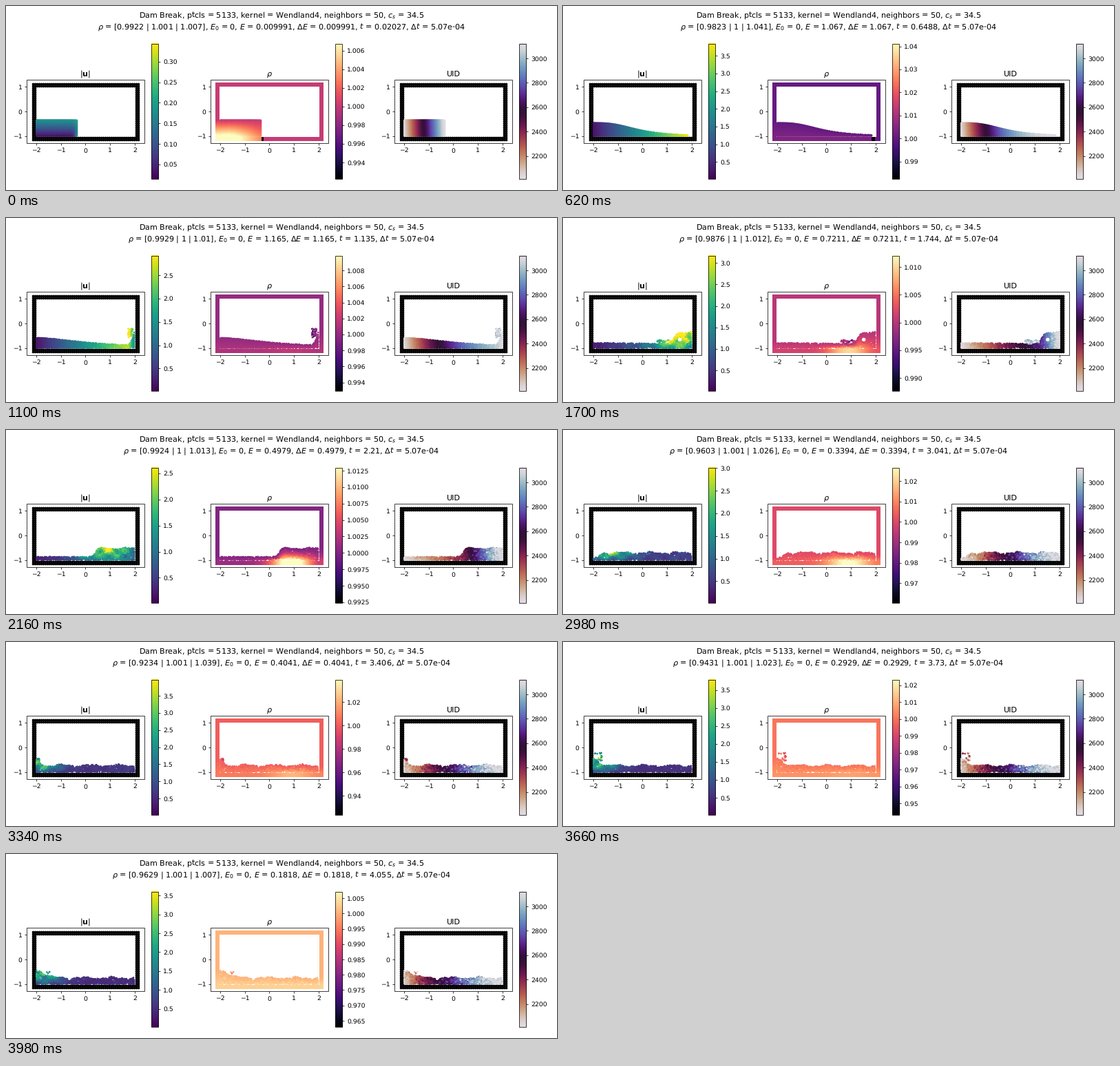
A matplotlib script for the animation above (4 s loop, 800 px wide and 267 px high).

```python
import numpy as np
import matplotlib as mpl
import matplotlib.pyplot as plt
from matplotlib.animation import FuncAnimation
from matplotlib.patches import Rectangle
from matplotlib.ticker import MaxNLocator

W, H, FRAMES = 800, 267, 200
PX = 0.72                        # points per pixel at 100 dpi
DT = 0.020274                    # simulated seconds per frame
UNIT, MID_Y = 35.8, 153.2        # pixels per data unit, panel centre line
CENTRES = (115.3, 382.3, 649.3)
HALF_W, HALF_H = 85.3, 45.9
BAR_TOP, BAR_BOTTOM, BAR_W = 55.2, 251.3, 10.2
COLS, ROWS = 53, 21
VOLUME = 1.112
UID_RANGE = (2009, 3118)

# Readouts at a few moments: rho min, mean, max, energy, top speed
READOUTS = {
    0: (.9922, 1.001, 1.0067, .009991, .343),
    31: (.9823, 1, 1.041, 1.067, 3.83),
    55: (.9929, 1, 1.0098, 1.165, 2.91),
    85: (.9876, 1, 1.012, .7211, 3.16),
    131: (.9971, 1.001, 1.0138, .2747, 2.04),
    167: (.9234, 1.001, 1.039, .4041, 3.96),
    199: (.9629, 1.001, 1.007, .1818, 3.59),
}

mpl.rcParams["text.hinting"] = "no_hinting"


def readouts(n):
    return [np.interp(n, list(READOUTS), c) for c in zip(*READOUTS.values())]


def ramp(t, a, b):
    u = np.clip((t - a) / (b - a), 0, 1)
    return u * u * (3 - 2 * u)


def sigmoid(u):
    return 1 / (1 + np.exp(-np.clip(u, -50, 50)))


def bell(u):
    return np.exp(-u * u)


def reflect(v):
    return np.clip(1 - np.abs(1 - np.abs(v)), 0, 1)


def front(t):
    """Leading edge of the collapsing column."""
    return min(2, -0.33 + 2.18 * (t / 0.649) ** 1.4 - 0.017 * (t < 0.03))


def bore(t):
    """Edge of the wave thrown back by the right wall."""
    return max(-2.4, 1.95 - 1.227 * max(0, t - 1.05) ** 1.6)


def mixing(t):
    return float(np.clip((t - 1) / 1.6, 0, 1))


def surface(t):
    """Height of the water above the floor; its volume is constant."""
    x = np.linspace(-2, front(t), 400)
    s = (x + 2) / (x[-1] + 2)
    bend = 0.46 + 1.2 * np.exp(-t / 0.15) + 1.2 * max(0, t - 0.65) ** 3
    power = 1.4 + 10 * np.exp(-t / 0.35)
    base = 1 / (1 + (s / bend) ** power)
    back = 0.7 * np.exp(-(t - 1.1) / 1.6) * ramp(t, 0.72, 1.0)
    bump = back * sigmoid((x - bore(t)) / 0.06)
    late = max(0, t - 3.15)
    bump += (0.32 * (1 - np.exp(-late / 0.25))
             * bell((x + 2) / (0.1 + 0.4 * late)))
    bump += (0.035 * mixing(t) * sigmoid((x - bore(t)) / 0.1)
             * (np.sin(5.5 * x + 2 * t) + 0.5 * np.sin(13 * x - 3 * t)))
    return x, base * (VOLUME / (x[-1] + 2) - bump.mean()) / base.mean() + bump


rng = np.random.default_rng(4)
col, row = [g.ravel() for g in
            np.meshgrid(np.arange(COLS), np.arange(ROWS), indexing="ij")]
COUNT = col.size
along0, up0 = (col + 0.5) / COLS, (row + 0.5) / ROWS
stagger = ((row * 8 % ROWS + 0.5) / ROWS - 0.5) / COLS
drift = rng.normal(size=COUNT) * (0.02 + 0.07 * along0)
lift = rng.normal(size=COUNT) * 0.15
phase = rng.uniform(0, 2 * np.pi, COUNT)
grain = rng.normal(size=COUNT)
thin = rng.random(COUNT) ** 5


def make_spray(count, pool, start, origin, vx, vy):
    idx = rng.choice(np.flatnonzero(pool), count, replace=False)
    return idx, start, origin, rng.uniform(*vx, count), rng.uniform(*vy, count)


SPRAYS = [
    make_spray(40, along0 > 0.8, 0.77, (1.95, -.7), (-.6, -.1), (1.3, 2.3)),
    make_spray(35, along0 > 0.75, 1.34, (1.5, -.45), (-2.3, -.8), (.1, .5)),
    make_spray(26, along0 < 0.4, 3.3, (-1.95, -.65), (.05, .75), (1.1, 2.1)),
]


def fluid(t, grid, top):
    """Positions, relative place and spray mask of all particles."""
    mix = mixing(t)
    q = reflect(along0 + stagger * min(1, t / 0.25) + mix * drift)
    up = reflect(up0 + mix * lift)
    cdf = np.cumsum(top)
    x = np.interp(q, np.r_[0, cdf / cdf[-1]], np.r_[-2, grid])
    y = -1 + up * np.interp(x, grid, top)
    x += mix * 0.015 * np.sin(7.4 * t + phase)
    y += mix * 0.012 * np.cos(6.4 * t + phase)

    # Air pocket under the breaking wave
    r = 0.13 * max(0, 1 - abs(t - 1.72) / 0.4)
    dx, dy = x - 1.52, y + 0.65
    dist = np.hypot(dx, dy) + 1e-6
    push = np.where(dist < r, r / dist, 1)
    x, y = 1.52 + dx * push, -0.65 + dy * push

    flying = np.zeros(COUNT, bool)
    for idx, start, (x0, y0), vx, vy in SPRAYS:
        s = t - start
        if s <= 0:
            continue
        px, py = x0 + vx * s, y0 + vy * s - 2.5 * s * s
        free = py > -1 + np.interp(px, grid, top)
        hit = idx[free]
        x[hit], y[hit], flying[hit] = px[free], py[free], True
    return np.clip(x, -1.98, 1.98), np.maximum(y, -0.985), q, up, flying


def speed(t, x, y, q, up, flying):
    """Speed relative to the fastest particle."""
    s = (x + 2) / (front(t) + 2)
    run = (0.04 + 0.95 * s) * np.exp(-max(0, t - 1.1) / 0.9)
    run *= 1 - 0.45 * ramp(t, 0.7, 0.9) * sigmoid((x - 1.85) / 0.04)
    crash = 0.4 * bell(x - bore(t) - 0.4) * ramp(t, 1.1, 1.7)
    swirl = np.sin(9 * x + 4 * t) * np.sin(14 * y - 2.5 * t)
    flow = run + crash * (0.4 + 1.2 * up)
    flow = flow * (1 + mixing(t) * (0.4 * swirl + 0.12 * grain))
    flow += 0.1 * mixing(t) + 0.15 * flying
    sink = 0.03 + 0.48 * up + 0.6 * np.exp(-25 * (1 - q) - 2 * up)
    start = np.exp(-(t - DT) / 0.16)
    return np.clip(start * sink + (1 - start) * flow, 0, 1)


def excess(t, x, depth):
    """Density added by the water above and by the plunging wave."""
    still = 0.47 * np.exp(-(t - DT) / 0.15) * bell((x + 1.7) / 1.3)
    blow = 0.75 * bell((t - 2.4) / 0.75) * bell((x - 0.9) / 0.85)
    return depth * (still + 0.06) + depth ** 1.7 * blow


fig = plt.figure(figsize=(8, 2.67), dpi=100, facecolor="white")
ax = fig.add_axes([0, 0, 1, 1])
ax.axis("off")

TICK = dict(ls="none", color="k", ms=3.24 * PX, mew=0.74 * PX)
SMALL, LARGE = 9.26 * PX, 11.11 * PX
CMAPS = ("viridis", "magma", "twilight_r")


def frame_box(x, y, w, h):
    ax.add_patch(Rectangle((x, y), w, h, fc="none", ec="k",
                           lw=0.74 * PX, zorder=5))


def minus(v):
    return str(v).replace("-", "\u2212")


def draw_panel(cx, title):
    left, bottom = cx - HALF_W, MID_Y + HALF_H
    frame_box(left, MID_Y - HALF_H, 2 * HALF_W, 2 * HALF_H)
    ax.text(cx, MID_Y - HALF_H - 5.4, title, ha="center", fontsize=LARGE)
    xt, yt = np.arange(-2, 3), np.arange(-1, 2)
    ax.plot(cx + xt * UNIT, np.full(5, bottom), marker=3, **TICK)
    ax.plot(np.full(3, left), MID_Y - yt * UNIT, marker=0, **TICK)
    for v in xt:
        ax.text(cx + v * UNIT, bottom + 6.5, minus(v), ha="center", va="top",
                fontsize=SMALL)
    for v in yt:
        ax.text(left - 6.5, MID_Y - v * UNIT, minus(v), ha="right",
                va="center_baseline", fontsize=SMALL)


class Bar:
    """Colour bar whose ticks follow a changing range."""
    locator = MaxNLocator(nbins=9, steps=[1, 2, 2.5, 5, 10])

    def __init__(self, cx, cmap):
        x = cx + 95.9
        self.right = x + BAR_W
        ax.imshow(np.linspace(1, 0, 256)[:, None], cmap=cmap, aspect="auto",
                  interpolation="nearest",
                  extent=(x, self.right, BAR_BOTTOM, BAR_TOP))
        frame_box(x, BAR_TOP, BAR_W, BAR_BOTTOM - BAR_TOP)
        self.ticks, = ax.plot([], [], marker=1, **TICK)
        self.labels = [ax.text(0, 0, "", va="center_baseline", fontsize=SMALL)
                       for _ in range(11)]

    def set_range(self, lo, hi):
        values = self.locator.tick_values(lo, hi)
        step = values[1] - values[0]
        digits = next((d for d in range(5) if
                       abs(step * 10**d - round(step * 10**d)) < 1e-5), 5)
        values = [v for v in values if lo <= v <= hi][:len(self.labels)]
        ys = [BAR_BOTTOM - (v - lo) / (hi - lo) * (BAR_BOTTOM - BAR_TOP)
              for v in values]
        self.ticks.set_data([self.right] * len(ys), ys)
        for label in self.labels:
            label.set_text("")
        for label, v, y in zip(self.labels, values, ys):
            label.set_text(f"{v:.{digits}f}")
            label.set_position((self.right + 6.5, y))


for cx, title in zip(CENTRES, (r"$|\mathbf{u}|$", r"$\rho$", "UID")):
    draw_panel(cx, title)
bars = [Bar(cx, cmap) for cx, cmap in zip(CENTRES, CMAPS)]
bars[2].set_range(*UID_RANGE)

# Dotted black walls
gx, gy = np.meshgrid(np.arange(-76.5, 77, 3), np.arange(-40.5, 41, 3))
edge = (np.abs(gx) > 72) | (np.abs(gy) > 36)
for cx in (CENTRES[0], CENTRES[2]):
    ax.plot(cx + gx[edge], MID_Y + gy[edge], "o", color="k",
            ms=3.7 * PX, mew=0, zorder=2)

# Wall carrying the density of the fluid beside it
wx, wy = np.meshgrid(np.arange(-78, 78.5), np.arange(42, -42.5, -1))
wall = (np.abs(wx) > 72) | (np.abs(wy) > 36)
wall_x = np.clip(wx[wall] / UNIT, -2, 2)
wall_y = np.clip(wy[wall] / UNIT, -1, 1)
wall_img = ax.imshow(np.full(wx.shape, np.nan), cmap=CMAPS[1], vmin=0, vmax=1,
                     aspect="auto", interpolation="nearest", zorder=2,
                     extent=(CENTRES[1] - 78.5, CENTRES[1] + 78.5,
                             MID_Y + 42.5, MID_Y - 42.5))

dots = [ax.scatter(np.zeros(COUNT), np.zeros(COUNT), s=(2.8 * PX) ** 2,
                   c=np.linspace(0, 1, COUNT), cmap=cmap, vmin=0, vmax=1,
                   linewidths=0, zorder=3) for cmap in CMAPS]

HEAD = ("Dam Break, ptcls = 5133, kernel = Wendland4, "
        "neighbors = 50, $c_s$ = 34.5\n")
head = ax.text(400, 6.2, HEAD, ha="center", va="top", fontsize=LARGE)
ax.set_xlim(0, W)
ax.set_ylim(H, 0)


def wall_density(t, rest, grid, top):
    height = np.interp(wall_x, grid, top, right=0)
    depth = np.clip(1 - (wall_y + 1) / np.maximum(height, 1e-3), 0, 1)
    rho = rest + excess(t, wall_x, depth * (height > 0))
    if grid[-1] < 2:                            # thin spot at the front
        gap = np.abs(wall_x - grid[-1] - 0.05) < 0.03 + 0.05 * t
        rho[gap & (wall_y < -0.99)] = 0
    return np.clip(rho, 0, 1)


def update(n):
    t = DT * (n + 1)
    grid, top = surface(t)
    x, y, q, up, flying = fluid(t, grid, top)

    lo, mean, hi, energy, top_speed = readouts(n)
    rest = (1 - lo) / (hi - lo)
    rho = rest + excess(t, x, 1 - up) + 0.012 * mixing(t) * grain
    rho[flying] = rest * (1 - 0.8 * thin[flying])

    img = np.full(wx.shape, np.nan)
    img[wall] = wall_density(t, rest, grid, top)
    wall_img.set_data(img)

    for cx, d in zip(CENTRES, dots):
        d.set_offsets(np.column_stack([cx + x * UNIT, MID_Y - y * UNIT]))
    dots[0].set_array(speed(t, x, y, q, up, flying))
    dots[1].set_array(np.clip(rho, 0, 1))

    bars[0].set_range(0.014, top_speed)
    bars[1].set_range(lo, hi)
    head.set_text(
        HEAD + rf"$\rho$ = [{lo:.4g} | {mean:.4g} | {hi:.4g}], $E_0$ = 0, "
        rf"$E$ = {energy:.4g}, $\Delta E$ = {energy:.4g}, "
        rf"$t$ = {t:.4g}, $\Delta t$ = 5.07e-04")
    return [head, wall_img, *dots]


anim = FuncAnimation(fig, update, frames=FRAMES, interval=20, repeat=True)
plt.show()
```
